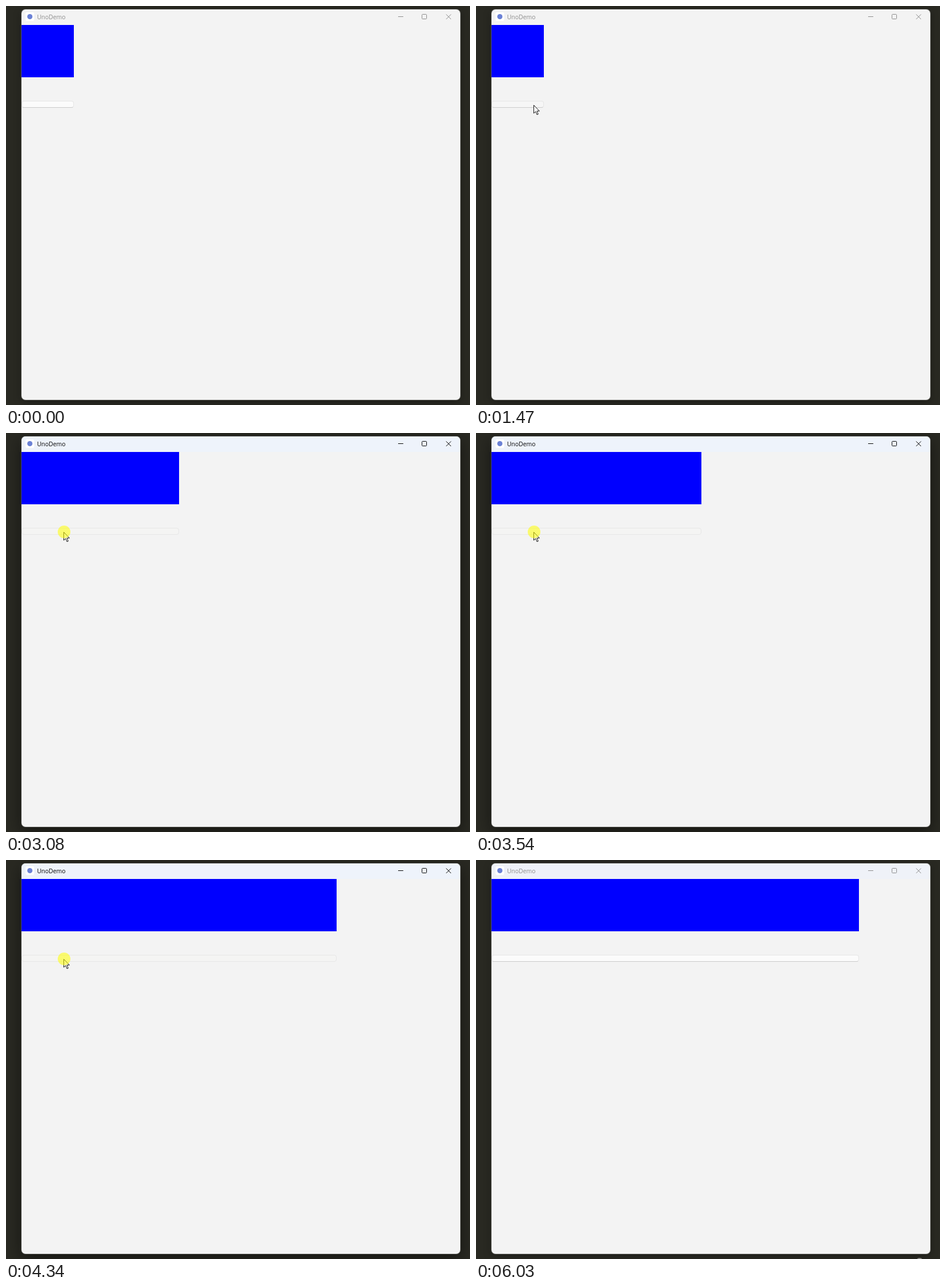
Recreate the animation shown at these times as an HTML page. Size 807 px wide and 694 px high, loop 6.1 s.

```html
<!DOCTYPE html>
<html lang="en">
<head>
<meta charset="utf-8">
<title>UnoDemo</title>
<style>
  html, body { margin: 0; width: 100%; height: 100%; overflow: hidden; }
  body { position: relative; background: #292922; }
  div, svg { position: absolute; box-sizing: border-box; }
  #win {
    left: 27px; top: 6px; width: 763px; height: 679px;
    border-radius: 7px; background: #f3f3f3;
    box-shadow: 0 0 0 1px #55554f, 0 3px 14px rgba(0, 0, 0, .35);
  }
  #win.active { box-shadow: 0 0 0 1px #4a4a45, 0 8px 26px rgba(0, 0, 0, .5); }
  #bar {
    left: 0; top: 0; width: 100%; height: 27px;
    border-radius: 7px 7px 0 0; background: #eef3fb;
  }
  #icon { left: 7px; top: 5px; width: 15px; height: 15px; border-radius: 3px; background: #fff; }
  #icon div { left: 3px; top: 3px; width: 9px; height: 9px; border-radius: 50%; background: #6b82d6; }
  #name {
    left: 27px; top: 5px; line-height: 16px;
    font-family: "Open Sans", "Noto Sans", sans-serif; font-size: 10.4px;
  }
  #caption { left: 655px; top: 8px; }
  #box { left: 27px; top: 33px; height: 91px; background: #00f; }
  #button {
    left: 27px; top: 165px; height: 12px; border-radius: 4px;
    border: 1px solid #e6e6e6;
  }
  #button.normal { background: #fbfbfb; border-bottom-color: #cbcbcb; }
  #button.hover { background: #f6f6f6; border-bottom-color: #cbcbcb; }
  #button.pressed { background: #f4f4f3; }
  #cursor { left: 0; top: 0; overflow: visible; }
  #halo {
    left: 90px; top: 161px; width: 22px; height: 22px;
    border-radius: 50%; background: rgba(255, 255, 0, .55);
  }
  #peek {
    left: 767px; top: 692px; width: 9px; height: 6px;
    border-radius: 50%; background: #858580;
  }
</style>
</head>
<body>
<div id="win">
  <div id="bar"></div>
  <div id="icon"><div></div></div>
  <div id="name">UnoDemo</div>
  <svg id="caption" width="94" height="10" fill="none" stroke="currentColor">
    <path d="M0 4.5h9M83.5 .5l8.5 8.5M92 .5l-8.5 8.5"/>
    <rect x="41.5" y=".5" width="8" height="8" rx="1"/>
  </svg>
</div>
<div id="box"></div>
<div id="button"></div>
<svg id="cursor" width="12" height="19">
  <path d="M.5 .5V14.6L3.7 11.6L6 17L8.2 16.1L5.9 10.8H10.3Z" fill="#fff" stroke="#111"/>
</svg>
<div id="halo"></div>
<div id="peek"></div>
<script>
const LOOP = 6100;
const presses = [[2140, 2270], [2600, 2750], [3080, 3210], [3540, 3670], [3940, 4070], [4340, 4480]];

// Stepped, decelerating moves: start, end, count of steps, from, to, power
const moves = [
  [180, 780, 9, [672, 642], [141, 231], 2],
  [781, 1400, 9, [141, 231], [101, 172], 2],
  [1470, 1470, 1, [100, 172], [100, 172], 1],
  [4790, 5030, 3, [100, 172], [308, 410], 1],
  [5031, 5430, 6, [308, 410], [726, 676], 1.5]
];

const $ = id => document.getElementById(id);
const show = (id, on) => { $(id).style.visibility = on ? "visible" : "hidden"; };

function pointer(t) {
  if (t < 180 || t >= 5500) return null;
  const [start, end, count, from, to, power] = moves.filter(m => t >= m[0]).pop();
  const part = end > start ? Math.min(1, (t - start) / (end - start)) : 1;
  const step = Math.floor(part * count + 1e-6) / count;
  const k = 1 - (1 - step) ** power;
  return from.map((v, i) => Math.round(v + (to[i] - v) * k));
}

function activity(t) {
  if (t < 2140 || t >= 6030) return 0;
  return t < 2210 ? .5 : 1;
}

function draw(t) {
  const right = Math.round(26.6 + 91.4 * (1 + presses.filter(p => t >= p[1]).length));
  const pressed = presses.some(p => t >= p[0] && t < p[1]);
  const at = pointer(t);
  const over = at && at[0] < right && at[1] >= 165 && at[1] < 177;
  const active = activity(t);
  const ink = Math.round(140 - 136 * active);

  $("box").style.width = $("button").style.width = right - 27 + "px";
  $("button").className = pressed ? "pressed" : over ? "hover" : "normal";
  $("win").className = active ? "active" : "";
  $("win").style.color = `rgb(${ink},${ink},${ink})`;
  $("bar").style.opacity = t >= 6030 ? .7 : active;
  show("halo", pressed);
  show("peek", t >= 6030);
  show("cursor", at);
  if (at) $("cursor").style.transform = `translate(${at[0]}px, ${at[1]}px)`;
}

const begin = performance.now();
function tick() {
  draw((performance.now() - begin) % LOOP);
  requestAnimationFrame(tick);
}
tick();
</script>
</body>
</html>
```
